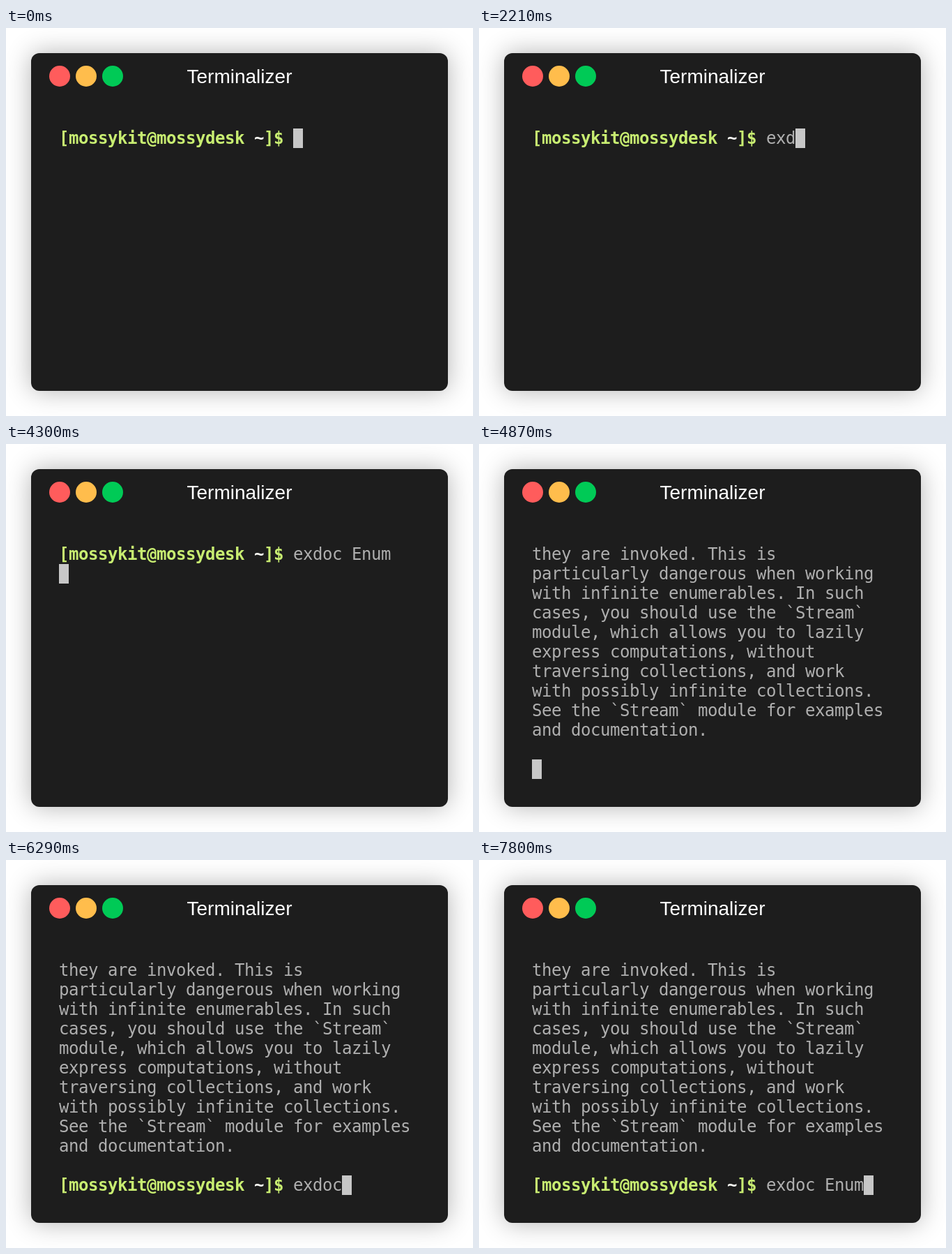
These frames come from a looping animation (670 by 556 pixels, 8 s). An HTML page:

```html
<!DOCTYPE html>
<html lang="en">
<head>
<meta charset="utf-8">
<title>Terminal</title>
<style>
  html, body { margin: 0; width: 100%; height: 100%; overflow: hidden; background: #fff; }
  #window {
    position: absolute; left: 36px; top: 36px; width: 598px; height: 484px;
    border-radius: 12px; background: #1d1d1d; box-shadow: 0 0 36px #b3b3b3;
  }
  #window i { position: absolute; top: 18px; width: 30px; height: 30px; border-radius: 50%; }
  #title {
    position: absolute; left: 0; top: 18px; width: 100%; text-align: center;
    font: 28px/32px "Liberation Sans", Arial, sans-serif; color: #fff;
  }
  #screen {
    position: absolute; left: 40px; top: 108px; margin: 0;
    font: 24px/28px "DejaVu Sans Mono", monospace;
    letter-spacing: calc(14px - 1ch); color: #afafaf;
  }
  #screen b { color: #c8ed71; }
  #screen b b { color: #f9f9f4; }
  #screen u { display: inline-block; width: 14px; height: 28px; vertical-align: top; background: #c7c7c7; }
</style>
</head>
<body>
<div id="window">
  <i style="left:26px;background:#ff5c5c"></i>
  <i style="left:64px;background:#ffbd4c"></i>
  <i style="left:102px;background:#00ca56"></i>
  <div id="title">Terminalizer</div>
  <pre id="screen"></pre>
</div>
<script>
const LOOP = 8000, ENTER = 4300, OUTPUT = 4870, PROMPT = 4970;
const command = 'exdoc Enum';
const firstKeys = [1840, 2030, 2210, 2340, 2500, 2660, 3570, 3760, 3910, 4120];
const secondKeys = [5360, 5590, 5910, 6160, 6290, 6860, 7290, 7450, 7610, 7800];
const prompt = '<b>[mossykit@mossydesk <b>~</b>]$</b> ';
const cursor = '<u></u>';
const output = `they are invoked. This is
particularly dangerous when working
with infinite enumerables. In such
cases, you should use the \`Stream\`
module, which allows you to lazily
express computations, without
traversing collections, and work
with possibly infinite collections.
See the \`Stream\` module for examples
and documentation.

`;
const screenElement = document.getElementById('screen');
let shown = '';

const typed = (keys, t) => prompt + command.slice(0, keys.filter(k => k <= t).length);

function content(t) {
  if (t < ENTER) return typed(firstKeys, t);
  if (t < OUTPUT) return typed(firstKeys, t) + '\n';
  return output + (t < PROMPT ? '' : typed(secondKeys, t));
}

function draw() {
  const html = content(performance.now() % LOOP) + cursor;
  if (html !== shown) screenElement.innerHTML = shown = html;
  requestAnimationFrame(draw);
}
draw();
</script>
</body>
</html>
```
